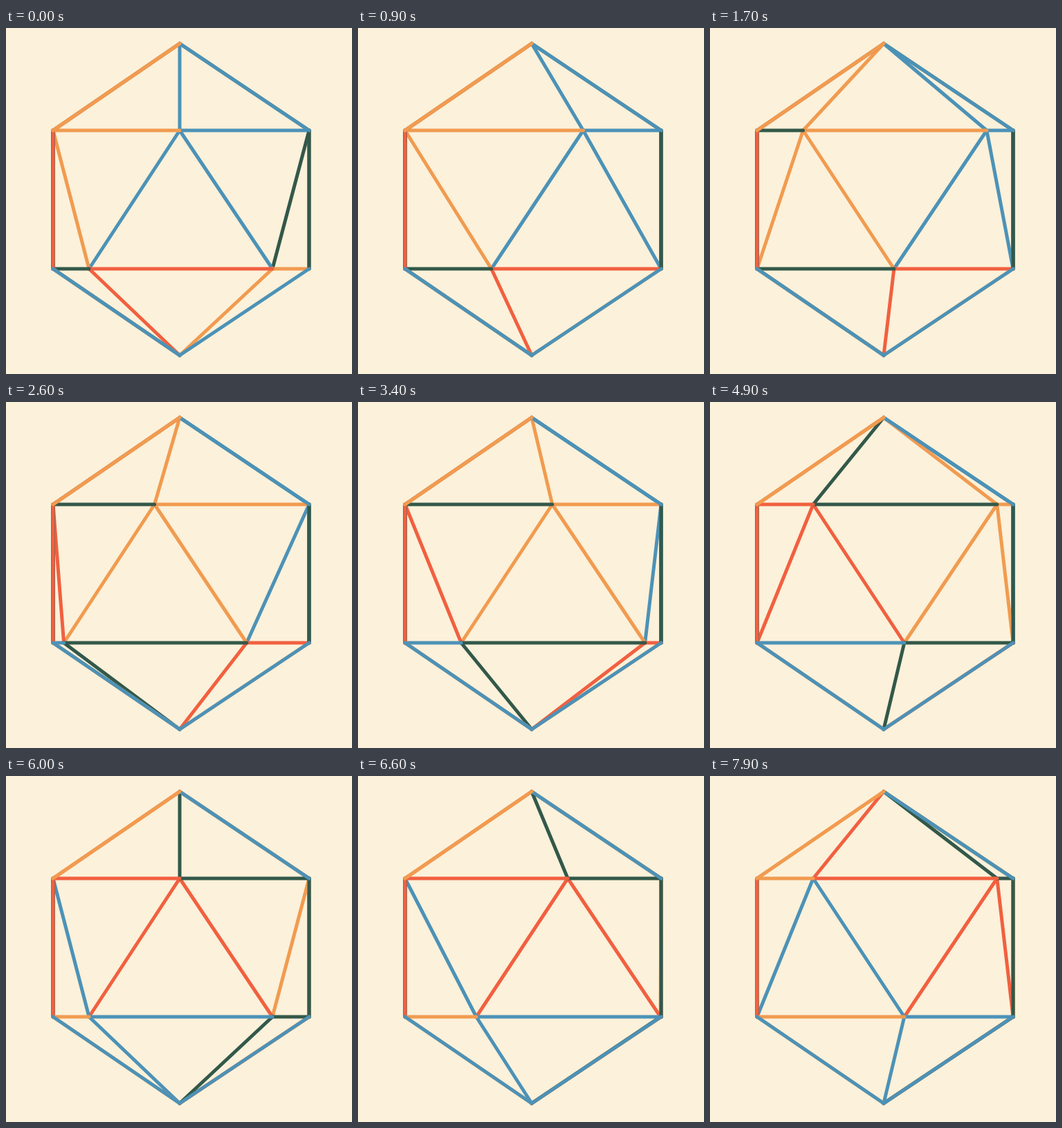
Animation, 500 px wide and 500 px high, one loop 8000 ms. Source, as an HTML page:

```html
<!DOCTYPE html>
<html lang="en">
<head>
<meta charset="utf-8">
<title>Turning icosahedron</title>
<style>
  html, body { margin: 0; width: 100%; height: 100%; overflow: hidden; background: #fcf1da; }
  svg { display: block; width: 100%; height: 100%; }
  line { stroke-width: 5; stroke-linecap: round; }
</style>
</head>
<body>
<svg id="stage" viewBox="0 0 500 500"></svg>
<script>
const LOOP = 8000, TICK = 100, STEPS_PER_TICK = 1.2, STEPS_PER_SLOT = 18;
const LEFT = 68, RIGHT = 438, MID = 251, TOP = 148, BOTTOM = 348;
const APEX = [MID, 22.5], BASE = [MID, 473];
const blue = '#4c92b7', orange = '#f19b50', green = '#33584a', red = '#f16040';

// Vertices enter from the left in this order; the first one starts furthest right.
const upper = [
  { edge: green, face: green },
  { edge: blue, face: blue },
  { edge: orange, face: orange },
  { edge: green, face: red },
  { edge: red, face: blue },
  { edge: orange, face: green }
];
const lower = [orange, red, green, blue, orange];

const stage = document.getElementById('stage');

function addLine(color) {
  const line = document.createElementNS('http://www.w3.org/2000/svg', 'line');
  line.setAttribute('stroke', color);
  stage.appendChild(line);
  return line;
}

function place(line, [x1, y1], [x2, y2]) {
  line.setAttribute('x1', x1);
  line.setAttribute('y1', y1);
  line.setAttribute('x2', x2);
  line.setAttribute('y2', y2);
}

// Slot 0 is the middle; vertices stop at the outline on either side.
function slotX(slot) {
  const x = MID + slot * (slot < 0 ? 131 : 134);
  return Math.min(RIGHT, Math.max(LEFT, x));
}

const topPoint = (i, turn) => [slotX(2 - 2 * i + turn), TOP];
const lowPoint = (j, turn) => [slotX(1 - 2 * j + turn), BOTTOM];

const edges = [];
function addEdge(color, from, to) {
  edges.push({ line: addLine(color), from, to });
}

upper.forEach(({ face }, i) => {
  addEdge(face, t => topPoint(i, t), t => lowPoint(i, t));
  addEdge(face, t => topPoint(i, t), t => lowPoint(i - 1, t));
});
upper.forEach(({ edge }, i) => {
  addEdge(edge, t => topPoint(i, t), t => topPoint(i - 1, t));
  addEdge(edge, t => topPoint(i, t), () => APEX);
});
lower.forEach((color, j) => {
  addEdge(color, t => lowPoint(j, t), t => lowPoint(j - 1, t));
  addEdge(color, t => lowPoint(j, t), () => BASE);
});

const outline = [
  [red, [LEFT, TOP], [LEFT, BOTTOM]],
  [green, [RIGHT, TOP], [RIGHT, BOTTOM]],
  [blue, APEX, [RIGHT, TOP]],
  [orange, APEX, [LEFT, TOP]],
  [blue, BASE, [LEFT, BOTTOM]],
  [blue, BASE, [RIGHT, BOTTOM]]
];
outline.forEach(([color, from, to]) => place(addLine(color), from, to));

function draw(ms) {
  const tick = Math.floor((ms % LOOP) / TICK);
  const turn = Math.floor(tick * STEPS_PER_TICK + 1e-6) / STEPS_PER_SLOT;
  for (const { line, from, to } of edges) place(line, from(turn), to(turn));
}

let start;
function frame(now) {
  start ??= now;
  draw(now - start);
  requestAnimationFrame(frame);
}
draw(0);
requestAnimationFrame(frame);
</script>
</body>
</html>
```
